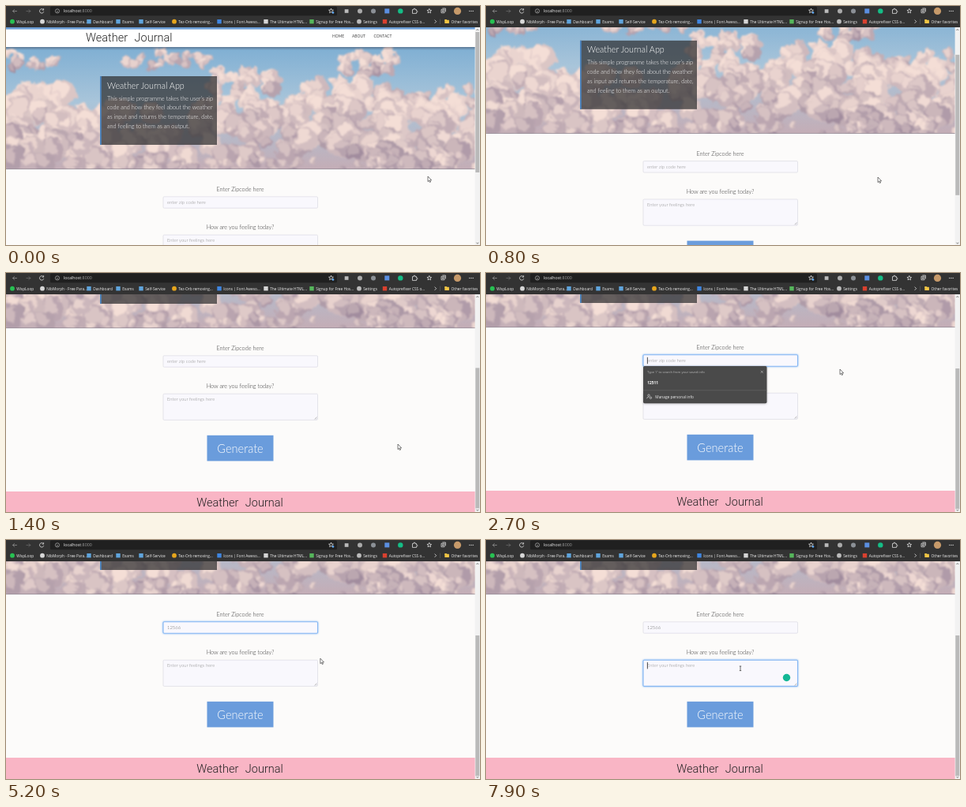
Animation of 600x303 px, one loop 8 s. Source, as an HTML page:

```html
<!DOCTYPE html>
<html lang="en">
<head>
<meta charset="utf-8">
<title>Weather Journal</title>
<style>
  html, body { margin: 0; width: 100%; height: 100%; overflow: hidden; background: #fcfbfa; }
  svg { display: block; width: 600px; height: 303px; }
  text { font-family: Lato, "Open Sans", sans-serif; font-weight: 300; white-space: pre; }
  .ui { font: 400 4.8px "Open Sans", "Noto Sans", sans-serif; fill: #eee; }
  .brand { font: 300 14.5px Roboto, Inter, sans-serif; word-spacing: 5px; fill: #222; }
  .nav { font-size: 4.9px; font-weight: 400; fill: #444; }
  .label { font-size: 7.3px; fill: #333; text-anchor: middle; }
  .field { font-size: 5.9px; fill: #666; }
  .hint { font-size: 5.9px; fill: #888; }
  .copy { font-size: 7.3px; fill: #fff; }
  .line { fill: none; stroke: #ddd; stroke-width: .8; }
</style>
</head>
<body>
<svg id="stage" viewBox="0 0 600 303" xmlns="http://www.w3.org/2000/svg"></svg>
<script>
const LOOP = 8000;
const ZIP_FOCUS = 2300, FEEL_FOCUS = 5600, POPUP_OPEN = 2400, POPUP_CLOSE = 4200;
const TYPED = [[3000, '1'], [3400, '12'], [3800, '125'], [4200, '1256'], [4600, '12566']];
const SCROLL = [[500, 0], [800, 45], [1250, 126], [1400, 137], [1500, 138]];
const POINTER = [[0, 534, 216], [100, 534, 216], [700, 496, 217], [1600, 496, 217],
  [2200, 402, 112], [2350, 402, 112], [2700, 448, 122], [2900, 448, 122],
  [3400, 520, 131], [4800, 520, 131], [5450, 322, 162]];

const rect = (x, y, w, h, fill, extra = '') =>
  `<rect x="${x}" y="${y}" width="${w}" height="${h}" fill="${fill}" ${extra}/>`;
const circle = (x, y, r, fill, extra = '') =>
  `<circle cx="${x}" cy="${y}" r="${r}" fill="${fill}" ${extra}/>`;
const text = (x, y, cls, str, extra = '') =>
  `<text x="${x}" y="${y}" class="${cls}" ${extra}>${str}</text>`;
const line = (d, extra = '') => `<path class="line" d="${d}" ${extra}/>`;
const clamp = v => Math.max(0, Math.min(1, v));
const mix = (a, b, p) => a + (b - a) * p;

function random(seed) {
  return () => (seed = (seed * 16807) % 2147483647) / 2147483647;
}

function star(x, y, r) {
  const points = Array.from({ length: 10 }, (_, i) => {
    const a = i * Math.PI / 5 - Math.PI / 2, d = i % 2 ? r * .45 : r;
    return `${(x + d * Math.cos(a)).toFixed(2)} ${(y + d * Math.sin(a)).toFixed(2)}`;
  });
  return line(`M${points.join('L')}Z`);
}

// Each mass is lit from above: cream crowns, mauve undersides.
function clouds() {
  const rnd = random(77);
  const masses = [
    [22, 68, 42, 10, 16], [205, 68, 60, 12, 20], [455, 73, 42, 16, 30],
    [300, 98, 45, 20, 26], [560, 118, 55, 16, 22],
    [150, 172, 110, 42, 60], [50, 152, 75, 50, 80], [310, 152, 75, 44, 75],
    [430, 138, 75, 46, 75], [535, 166, 85, 46, 90], [225, 206, 150, 16, 50], [470, 206, 140, 12, 40]
  ];
  const top = [244, 222, 214], low = [160, 140, 158];
  return masses.map(([cx, cy, rx, ry, n]) => Array.from({ length: n }, () => {
    const a = rnd() * 2 * Math.PI, d = Math.sqrt(rnd());
    return [cx + rx * d * Math.cos(a), d * Math.sin(a), 4 + rnd() * ry * .3, rnd()];
  }).sort((a, b) => a[1] - b[1]).map(([x, v, r, tone]) => {
    const depth = clamp(.32 + v * .3 + (tone - .5) * .55 + (cy > 200 ? .25 : 0));
    const shade = k => `rgb(${top.map((c, i) => Math.round(mix(c, low[i], clamp(depth + k))))})`;
    const y = cy + ry * v;
    return circle(x.toFixed(1), y.toFixed(1), r.toFixed(1), shade(.12)) +
      circle((x - r * .2).toFixed(1), (y - r * .25).toFixed(1), (r * .65).toFixed(1), shade(-.2));
  }).join('')).join('');
}

function hero() {
  return `<g clip-path="url(#heroClip)">
    ${rect(0, 52, 594, 155, 'url(#sky)')}
    <g filter="url(#puffy)">${clouds()}</g>
    ${rect(0, 52, 594, 4, 'url(#shade)')}
  </g>
  ${rect(0, 206.4, 594, .7, '#8f8692')}
  ${rect(119, 89, 148, 87, '#2e2e30', 'opacity=".72"')}
  ${rect(119, 89, 1.8, 87, '#4b83bd')}
  ${text(128, 104.5, 'copy', 'Weather Journal App', 'style="font-size:10.8px"')}
  ${['This simple programme takes the user\'s zip', 'code and how they feel about the weather',
    'as input and returns the temperature, date,', 'and feeling to them as an output.']
    .map((s, i) => text(128, 119.5 + i * 11.8, 'copy', s)).join('')}`;
}

function page() {
  return `${rect(0, 27, 594, 25, '#fff')}${rect(0, 27, 594, 2.6, '#6a9bd3')}
  ${text(101, 45, 'brand', 'Weather Journal')}
  ${text(413, 39.7, 'nav', 'HOME')}${text(438, 39.7, 'nav', 'ABOUT')}${text(465.5, 39.7, 'nav', 'CONTACT')}
  ${hero()}
  ${text(296.5, 234.8, 'label', 'Enter Zipcode here')}
  ${rect(199, 241.8, 195.5, 14.4, '#f9f8fd', 'id="zipBox" rx="1.2"')}
  ${text(204, 251, 'hint', 'enter zip code here', 'id="zipHint"')}
  ${text(204, 251, 'field', '', 'id="zipText"')}
  ${text(296.5, 283.3, 'label', 'How are you feeling today?')}
  ${rect(199, 290.2, 195.5, 33.2, '#f9f8fd', 'id="feelBox" rx="1.2"')}
  ${text(204, 299.4, 'hint', 'Enter your feelings here')}
  ${line('M390.5 322.5l3-3M392.2 322.5l1.3-1.3', 'style="stroke:#888;stroke-width:.5"')}
  ${circle(380.5, 312.5, 4.7, '#13b795', 'id="helper"')}
  ${rect(0, 0, .8, 8.4, '#222', 'id="caret"')}
  ${rect(254.5, 342.8, 84, 32.6, '#6a9cdc')}
  ${text(296.5, 364.6, 'label', 'Generate', 'style="font-size:14.6px;fill:#fff"')}
  ${rect(0, 414, 594, 30, '#f9b5c5')}
  ${text(296, 432.8, 'brand', 'Weather Journal', 'text-anchor="middle"')}`;
}

function popup() {
  return `<g id="popup">
    ${rect(199, 118.5, 156.5, 47.5, '#000', 'rx="2" opacity=".25" filter="url(#soft)"')}
    ${rect(199, 118, 156.5, 47.2, '#4a4a4a', 'rx="1.8"')}
    ${text(204, 127, 'ui', "Type '/' to search from your saved info", 'style="font-size:4.1px;fill:#b8b8b8"')}
    ${line('M347.8 123.8l3 3M350.8 123.8l-3 3', 'style="stroke-width:.5"')}
    ${text(204.3, 141, 'ui', '12511', 'style="font-weight:700;fill:#fff"')}
    ${rect(199, 148.6, 156.5, .5, '#6a6a6a')}
    ${circle(206, 155.2, 1.3, 'none', 'stroke="#ddd" stroke-width=".6"')}
    ${line('M203.6 159.2q0-2 2.4-2', 'style="stroke-width:.6"')}
    ${circle(208.4, 158.2, 1.2, 'none', 'stroke="#ddd" stroke-width=".7"')}
    ${text(214.3, 158.8, 'ui', 'Manage personal info')}
  </g>`;
}

function bookmarks() {
  const items = [
    [8, 'WispLoop', '#27c152', 1], [46, 'NibMorph - Free Para...', '#d8d8d8', 1],
    [105, 'Dashboard', '#5fa4dc'], [142, 'Exams', '#5fa4dc'], [171, 'Self-Service', '#5fa4dc'],
    [213, 'Tez-Orb removing...', '#e6a51c', 1], [270, 'Icons | Font Aweso...', '#3f86e0'],
    [329, 'The Ultimate HTML...', '#d5d5d5'], [387, 'Signup for Free Hos...', '#55b65b'],
    [447, 'Settings', '#bbb', 1], [479.5, 'Autoprefixer CSS o...', '#d9402f']
  ];
  return items.map(([x, name, color, round]) =>
    (round ? circle(x, 19.7, 2.9, color) : rect(x - 2.7, 17, 5.4, 5.4, color)) +
    text(x + 5.2, 21.6, 'ui', name)).join('');
}

function chrome() {
  return `${rect(0, 0, 600, 27, '#333')}
  ${rect(56, .6, 363, 11.6, '#202020', 'rx="1.5"')}
  ${line('M14 6.5h-5.4m2.3-2.3l-2.3 2.3l2.3 2.3', 'opacity=".55"')}
  ${line('M25.5 6.5h5.4m-2.3-2.3l2.3 2.3l-2.3 2.3', 'opacity=".3"')}
  ${line('M47.4 4.8a2.7 2.7 0 1 0 .4 2.4M47.6 3.2v1.9h-1.9')}
  ${circle(65, 6.4, 2.6, 'none', 'stroke="#ccc" stroke-width=".6"')}${rect(64.7, 6, .6, 2, '#ccc')}
  ${text(73, 8.3, 'ui', 'localhost<tspan fill="#999">:8000</tspan>', 'style="font-size:5.3px"')}
  ${star(411.5, 6.2, 3.1)}${circle(414, 8.4, 1.3, '#5aa0e8')}
  ${rect(428.7, 4.2, 4.8, 4.6, '#bbb')}
  ${circle(448, 6.4, 3, '#aaa')}${circle(465, 6.4, 3, '#8b9096')}
  ${rect(479.3, 3.4, 6, 6, '#5b8fe0')}${circle(499.3, 6.4, 3.2, '#15bd86')}
  ${line('M514.5 4.6h1.6a1 1 0 1 1 1.8 0h1.6v1.6a1 1 0 1 1 0 1.7v1.5h-5z')}
  ${star(535.8, 6.4, 3)}
  ${line('M551 4.3h4v4.4h-4zM552.4 3h4v4.3M553 5.3v2.4M551.8 6.5h2.4')}
  ${circle(571.5, 6.4, 4.6, '#c79a6a')}
  ${[586.8, 589, 591.2].map(x => circle(x, 6.4, .65, '#ddd')).join('')}
  ${bookmarks()}
  ${line('M542.6 17.6l2.1 2.1l-2.1 2.1')}${rect(549.5, 16.5, .5, 6.5, '#666')}
  ${rect(555.3, 17.8, 5.6, 4.2, '#f0c544', 'rx=".5"')}${rect(555.3, 17, 2.6, 1.4, '#f0c544')}
  ${text(563.5, 21.6, 'ui', 'Other favorites')}`;
}

const stage = document.getElementById('stage');
stage.innerHTML = `<defs>
  <linearGradient id="sky" x1="0" y1="0" x2="0" y2="1">
    <stop offset="0" stop-color="#7fafd3"/><stop offset=".45" stop-color="#a9c5da"/>
    <stop offset="1" stop-color="#c4adb6"/></linearGradient>
  <linearGradient id="shade" x1="0" y1="0" x2="0" y2="1">
    <stop offset="0" stop-color="#223" stop-opacity=".4"/><stop offset="1" stop-color="#223" stop-opacity="0"/></linearGradient>
  <filter id="puffy" filterUnits="userSpaceOnUse" x="-20" y="32" width="640" height="195">
    <feTurbulence type="fractalNoise" baseFrequency=".07" numOctaves="3" seed="4" result="noise"/>
    <feDisplacementMap in="SourceGraphic" in2="noise" scale="15" xChannelSelector="R" yChannelSelector="G"/>
    <feGaussianBlur stdDeviation="1.1"/></filter>
  <filter id="soft"><feGaussianBlur stdDeviation="1.5"/></filter>
  <clipPath id="heroClip"><rect x="0" y="52" width="594" height="155"/></clipPath>
</defs>
${rect(0, 27, 600, 276, '#fcfbfa')}
<g id="page">${page()}</g>
${popup()}
${rect(593.6, 27, 6.4, 276, '#f2f2f2')}
${line('M595.4 31l1.4-1.6l1.4 1.6M595.4 299.8l1.4 1.6l1.4-1.6', 'style="stroke:#666"')}
${rect(594.3, 33, 5, 178, '#b9b9b9', 'id="thumb"')}
${chrome()}
<path id="arrow" d="M0 0v6.6l1.5-1.4l1 2.3l1.1-.5l-1-2.2h2z" fill="#fff" stroke="#222" stroke-width=".6"/>
<path id="beam" d="M-1.2-2.8h2.4M0-2.8v5.6M-1.2 2.8h2.4" fill="none" stroke="#333" stroke-width=".7"/>`;

const el = Object.fromEntries([...stage.querySelectorAll('[id]')].map(n => [n.id, n]));
const show = (node, on) => node.setAttribute('visibility', on ? 'visible' : 'hidden');
const move = (node, x, y) => node.setAttribute('transform', `translate(${x} ${y})`);

function along(keys, t) {
  const next = keys.findIndex(k => k[0] > t);
  if (next === 0) return keys[0].slice(1);
  if (next < 0) return keys[keys.length - 1].slice(1);
  const a = keys[next - 1], b = keys[next];
  return a.slice(1).map((v, i) => mix(v, b[i + 1], (t - a[0]) / (b[0] - a[0])));
}

function ring(box, on) {
  box.setAttribute('stroke', on ? '#86b7f2' : '#d6d6de');
  box.setAttribute('stroke-width', on ? 1.1 : .6);
  box.style.filter = on ? 'drop-shadow(0 0 1px #7db4f5)' : 'none';
}

function render(t) {
  const [scroll] = along(SCROLL, t);
  move(el.page, 0, -scroll);
  move(el.thumb, 0, scroll * 88 / 138);

  const inZip = t >= ZIP_FOCUS && t < FEEL_FOCUS, inFeel = t >= FEEL_FOCUS;
  ring(el.zipBox, inZip);
  ring(el.feelBox, inFeel);

  const stroke = TYPED.filter(k => k[0] <= t).pop();
  el.zipText.textContent = stroke ? stroke[1] : '';
  show(el.zipHint, !stroke);

  const since = inFeel ? t - FEEL_FOCUS : t - Math.max(ZIP_FOCUS, stroke ? stroke[0] : 0);
  show(el.caret, (inZip || inFeel) && since % 1000 < 500);
  const typedWidth = inZip && stroke ? el.zipText.getComputedTextLength() : 0;
  move(el.caret, 203.9 + typedWidth, inFeel ? 293 : 244.8);
  show(el.helper, t >= FEEL_FOCUS + 200);

  const fade = clamp((t - POPUP_CLOSE) / 250);
  show(el.popup, t >= POPUP_OPEN && fade < 1);
  el.popup.setAttribute('opacity', 1 - fade);
  move(el.popup, stroke ? 2.3 : 0, stroke ? .8 : 0);

  const [x, y] = along(POINTER, t);
  const inside = (top, bottom) => x > 199 && x < 394.5 && y + scroll > top && y + scroll < bottom;
  const overField = inside(241.8, 256.2) || inside(290.2, 323.4);
  show(el.arrow, !overField);
  show(el.beam, overField);
  move(el.arrow, x, y);
  move(el.beam, x, y + .8);
}

const start = performance.now();
function tick() {
  render((performance.now() - start) % LOOP);
  requestAnimationFrame(tick);
}
tick();
</script>
</body>
</html>
```
